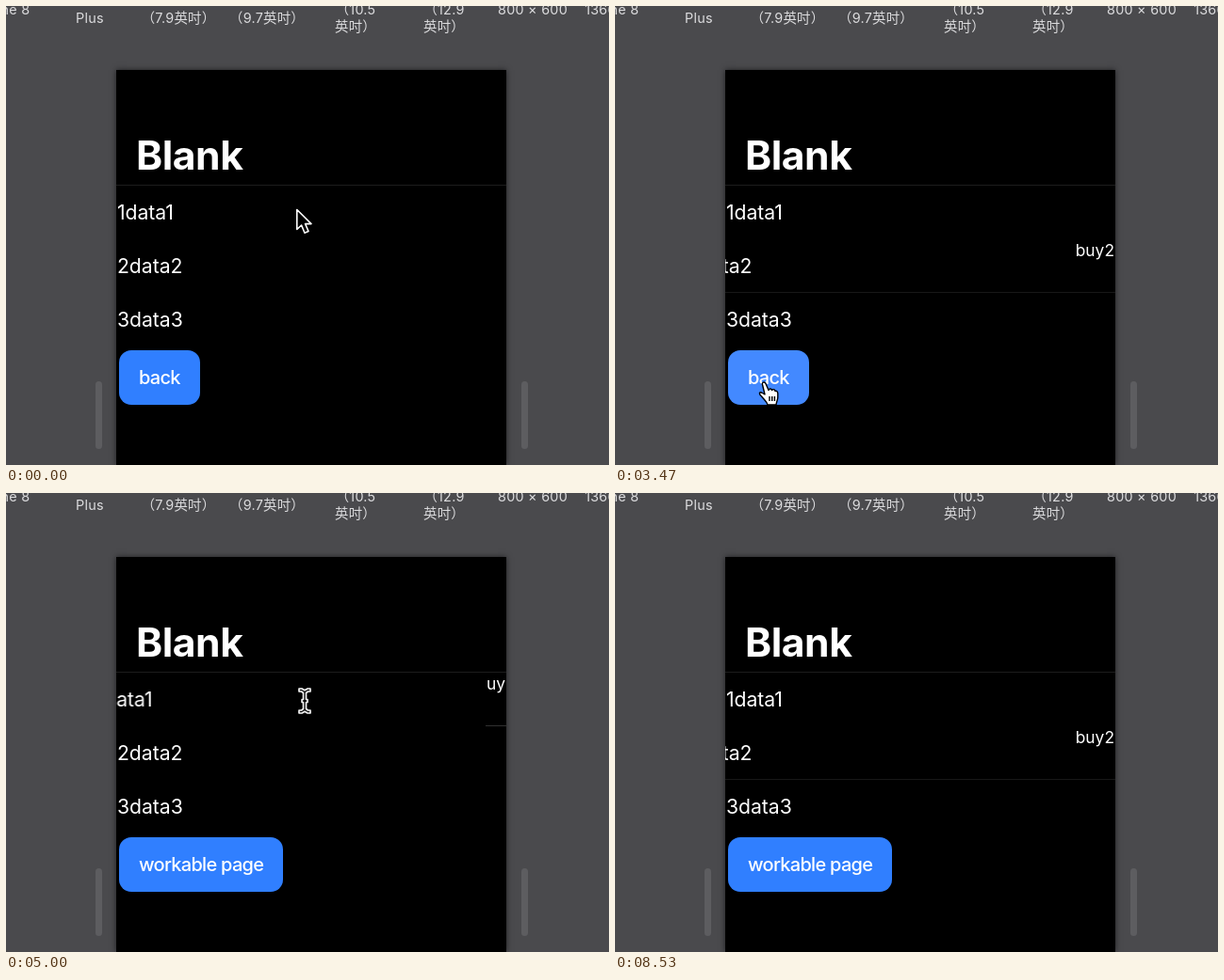
Recreate the animation shown at these times as an HTML page. Size 640 by 488 pixels, loop 8590 ms.

```html
<!DOCTYPE html>
<html lang="zh-Hant">
<head>
<meta charset="utf-8">
<title>Sliding rows</title>
<style>
:root { --loop: 8590ms; }
html, body { margin: 0; width: 100%; height: 100%; overflow: hidden; background: #4a4a4d; }
#stage {
  position: absolute; left: 0; top: 0; width: 640px; height: 488px; overflow: hidden;
  font-family: Inter, "Noto Sans CJK TC", "Noto Sans CJK", sans-serif;
}
#stage * { position: absolute; white-space: nowrap; }

.label {
  transform: translate(-50%, -50%); text-align: center;
  font-size: 14.4px; line-height: 18px; letter-spacing: .25px; color: #dcdcde;
}
.handle { top: 399px; width: 7px; height: 72px; border-radius: 4px; background: #5d5d60; }

#device { left: 117px; top: 68px; width: 414px; height: 420px; background: #000; box-shadow: 0 0 6px rgba(0, 0, 0, .6); }
#screen { inset: 0; overflow: hidden; }
.page { inset: 0; background: #000; color: #fff; animation: var(--loop) cubic-bezier(.32, .72, 0, 1) infinite; }
.page h1 {
  left: 21px; top: 66px; margin: 0; font-size: 42.6px; line-height: 50px;
  font-weight: 700; letter-spacing: -.45px;
}
.rule { left: 0; right: 0; top: 122px; height: 1px; background: #1c1c1c; }
.row { left: 0; width: 414px; height: 57px; overflow: hidden; }
.option { inset: 0; border-bottom: 1px solid #303030; font-size: 17.4px; line-height: 24px; }
.option span { right: 1px; top: 0; }
.item {
  inset: 0; background: #000; font-size: 21.2px; line-height: 57px; letter-spacing: -.05px;
  animation: var(--loop) cubic-bezier(.36, .66, .04, 1) infinite;
}
.item span { left: 1px; }
.item i { left: 0; width: 700px; bottom: 0; height: 1px; background: #181818; opacity: 0; animation: var(--loop) step-end infinite; }
.button {
  left: 3px; top: 298px; height: 58px; padding: 0 21px; border-radius: 13px; background: #307fff;
  font-size: 20px; line-height: 58px; font-weight: 500; letter-spacing: -.7px;
}

#leaving { animation-name: leave; }
#entering { animation-name: enter; }
#leaving .r1 .item { animation-name: a1; }
#leaving .r2 .item { animation-name: a2; }
#leaving .r2 i { animation-name: lineA; }
#leaving .button { animation: hover var(--loop) step-end infinite; }
#entering .r1 .item { animation-name: b1; }
#entering .r2 .item { animation-name: b2; }
#entering .r2 i { animation-name: lineB; }
.r1 { top: 123px; }
.r2 { top: 180px; }
.r3 { top: 237px; }

@keyframes leave {
  0%, 44.39% { transform: none; opacity: 1; }
  50.68%, 100% { transform: translateX(-33%); opacity: .72; }
}
@keyframes enter {
  0%, 44.39% { transform: translateX(100%); }
  50.68%, 100% { transform: none; }
}
/* Drags follow the pointer; releases use the row's own settling curve. */
@keyframes a1 {
  0%, 1.16% { transform: none; animation-timing-function: ease; }
  4.66%, 5.47% { transform: translateX(-78px); }
  11.29%, 18.51% { transform: translateX(-31px); }
  24.33%, 100% { transform: none; }
}
@keyframes a2 {
  0%, 27.47% { transform: none; animation-timing-function: ease; }
  30.73%, 31.43% { transform: translateX(-97px); }
  37.25%, 100% { transform: translateX(-42px); }
}
@keyframes b1 {
  0%, 57.51% { transform: none; animation-timing-function: linear; }
  58.21% { transform: translateX(-22px); animation-timing-function: ease-out; }
  60.3%, 61% { transform: translateX(-70px); }
  66.82%, 67.93% { transform: translateX(-31px); }
  73.75%, 100% { transform: none; }
}
@keyframes b2 {
  0%, 68.45% { transform: none; animation-timing-function: ease; }
  71.36%, 72.53% { transform: translateX(-99px); }
  78.35%, 100% { transform: translateX(-42px); }
}
@keyframes lineA { 0% { opacity: 0; } 27.47%, 100% { opacity: 1; } }
@keyframes lineB { 0% { opacity: 0; } 68.45%, 100% { opacity: 1; } }
@keyframes hover { 0% { background: #307fff; } 36.5% { background: #4389ff; } 44.39%, 100% { background: #307fff; } }

#cursor { left: 0; top: 0; width: 1px; height: 1px; overflow: visible; animation: move var(--loop) ease-in-out infinite; }
#cursor g { opacity: 0; fill: #000; stroke: #fff; stroke-width: 1.6; stroke-linejoin: round; animation: var(--loop) step-end infinite; }
#cursor .arrow { animation-name: arrow; }
#cursor .beam { animation-name: beam; }
#cursor .hand { stroke: #000; fill: #fff; stroke-width: 1.4; animation-name: hand; }

@keyframes move {
  0%, 1.16% { transform: translate(308px, 216px); }
  4.66%, 5.47% { transform: translate(190px, 219px); }
  15.48%, 17.46% { transform: translate(364px, 279px); }
  20.95%, 23.28% { transform: translate(207.5px, 280px); }
  26.66%, 27.47% { transform: translate(350px, 279px); }
  30.73%, 31.43% { transform: translate(190px, 284px); }
  37.25%, 46% { transform: translate(158px, 401px); }
  46.57%, 47.73% { transform: translate(158px, 398px); }
  52.97% { transform: translate(382px, 236px); }
  55.88%, 57.39% { transform: translate(352px, 221px); animation-timing-function: linear; }
  58.21% { transform: translate(317.5px, 221px); animation-timing-function: ease-out; }
  60.3%, 61% { transform: translate(250px, 224px); }
  67.05%, 67.93% { transform: translate(392px, 284px); }
  71.36% { transform: translate(244.5px, 286px); }
  72.53%, 78.35% { transform: translate(240px, 286px); }
  85.33%, 100% { transform: translate(536px, 450px); }
}
@keyframes arrow {
  0% { opacity: 1; } 1.16% { opacity: 0; }
  5.47% { opacity: 1; } 17.46% { opacity: 0; }
  23.28% { opacity: 1; } 27.47% { opacity: 0; }
  31.43% { opacity: 1; } 36.5% { opacity: 0; }
  44.6% { opacity: 1; } 57.39% { opacity: 0; }
  61% { opacity: 1; } 67.93% { opacity: 0; }
  73.4% { opacity: 1; } 85.33%, 100% { opacity: 0; }
}
@keyframes beam {
  0% { opacity: 0; }
  1.16% { opacity: 1; } 5.47% { opacity: 0; }
  17.46% { opacity: 1; } 23.28% { opacity: 0; }
  27.47% { opacity: 1; } 31.43% { opacity: 0; }
  57.39% { opacity: 1; } 61% { opacity: 0; }
  67.93% { opacity: 1; } 73.4%, 100% { opacity: 0; }
}
@keyframes hand { 0% { opacity: 0; } 36.5% { opacity: 1; } 44.6%, 100% { opacity: 0; } }
</style>
</head>
<body>
<div id="stage">
  <div class="label" style="left:10px;top:4px">ne 8</div>
  <div class="label" style="left:89px;top:13px">Plus</div>
  <div class="label" style="left:183px;top:13px">（7.9英吋）</div>
  <div class="label" style="left:277px;top:13px">（9.7英吋）</div>
  <div class="label" style="left:371px;top:13px">（10.5<br>英吋）</div>
  <div class="label" style="left:465px;top:13px">（12.9<br>英吋）</div>
  <div class="label" style="left:559px;top:4px">800 × 600</div>
  <div class="label" style="left:657px;top:4px">1366 × 1024</div>
  <div class="handle" style="left:95px"></div>
  <div class="handle" style="left:547px"></div>

  <div id="device"><div id="screen">
    <div class="page" id="leaving">
      <h1>Blank</h1><div class="rule"></div>
      <div class="row r1"><div class="option"><span>buy</span></div><div class="item"><span>1data1</span></div></div>
      <div class="row r2"><div class="option"><span>buy2</span></div><div class="item"><span>2data2</span><i></i></div></div>
      <div class="row r3"><div class="item"><span>3data3</span></div></div>
      <div class="button">back</div>
    </div>
    <div class="page" id="entering">
      <h1>Blank</h1><div class="rule"></div>
      <div class="row r1"><div class="option"><span>buy</span></div><div class="item"><span>1data1</span></div></div>
      <div class="row r2"><div class="option"><span>buy2</span></div><div class="item"><span>2data2</span><i></i></div></div>
      <div class="row r3"><div class="item"><span>3data3</span></div></div>
      <div class="button">workable page</div>
    </div>
  </div></div>

  <svg id="cursor">
    <g class="arrow"><path d="M.8 .5V21.5L5.6 17L9 25.2L13 23.5L9.6 15.6H16Z"/></g>
    <g class="beam"><path d="M-6-13H-3L0-11.3L3-13H6V-10H3.5L1.5-8.5V-1.5H3V1.5H1.5V8.5L3.5 10H6V13H3L0 11.3L-3 13H-6V10H-3.5L-1.5 8.5V1.5H-3V-1.5H-1.5V-8.5L-3.5-10H-6Z"/></g>
    <g class="hand">
      <path d="M-1.5 1.5C-2.5-1 .8-2 2 .5L5 7.5C5.5 5.5 8 5.5 8.6 7.5C9.5 6 11.7 6.5 12 8.5C13.5 7.7 14.8 9 14.8 11V15C14.8 18 13.5 19 13 23H4C3.5 20 .5 18-2.5 14C-6 11-4.5 8.5-1.5 10.5L1 12Z"/>
      <path d="M6 14V19M8.7 14V19M11.4 14V19" fill="none"/>
    </g>
  </svg>
</div>
</body>
</html>
```
